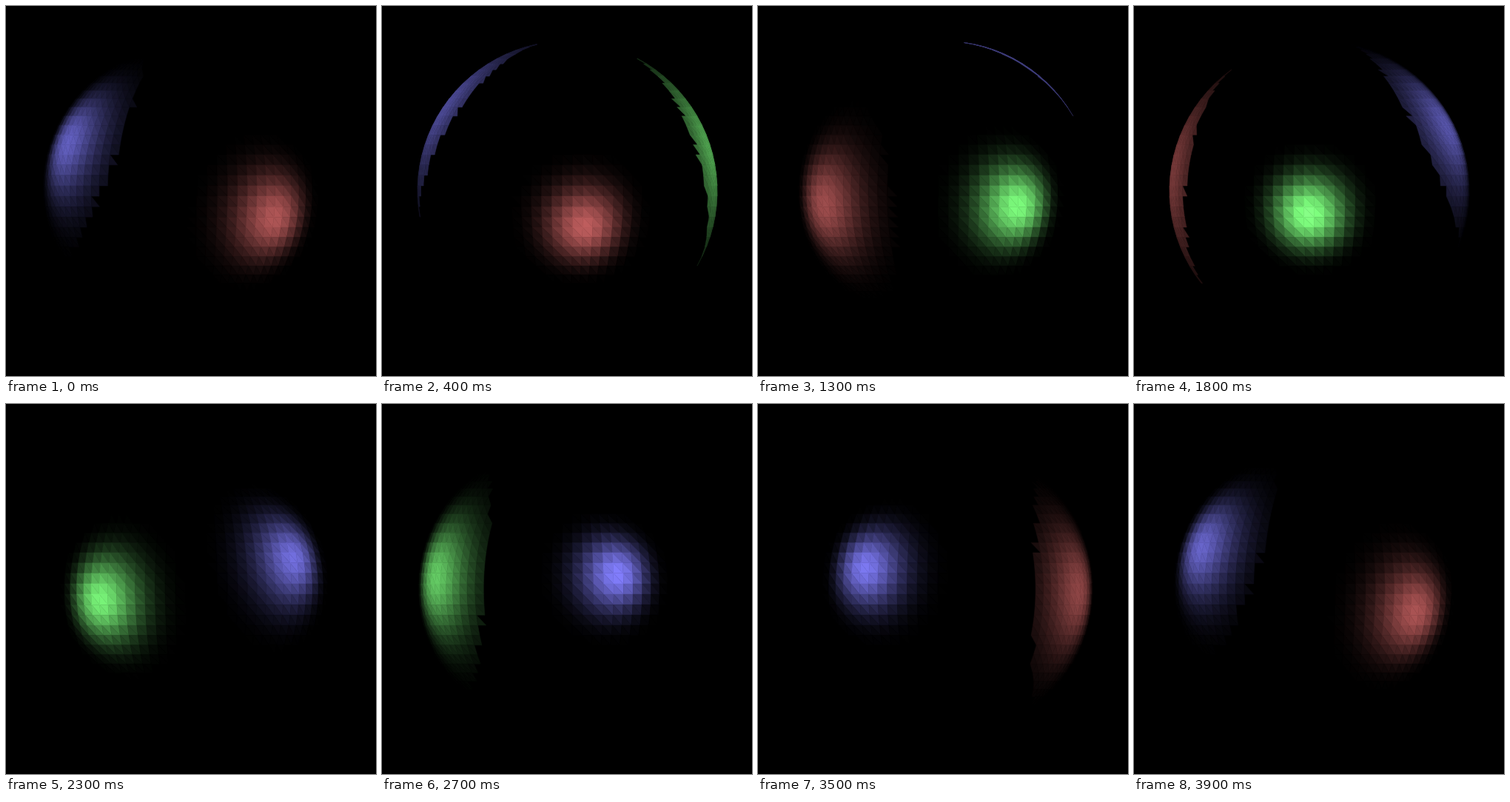
An HTML page with a canvas for the animation above (4 s loop, 500x500 px).

```html
<!DOCTYPE html>
<html lang="en">
<head>
<meta charset="utf-8">
<title>Three lights around a sphere</title>
<style>
html, body { margin: 0; width: 100%; height: 100%; overflow: hidden; background: #000; }
canvas { display: block; }
</style>
</head>
<body>
<canvas id="stage" width="500" height="500"></canvas>
<script>
const ctx = document.getElementById('stage').getContext('2d');
const LOOP = 4000, STEP = 100;
const CX = 250.5, CY = 250, R = 202.5;
const SEG = 45, RAD = Math.PI / 180;
const SHINE = 2.4, POWER = 0.65;

// Orbits in sphere radii: front is the time in ms the light passes the viewer.
const lights = [
  { color: [194, 95, 95], front: 500, radius: 1.65, height: 0.03, swing: 0.49 },
  { color: [126, 255, 126], front: 1740, radius: 1.6, height: -0.17, swing: 0.5 },
  { color: [112, 109, 218], front: 3002, radius: 1.43, height: -0.56, swing: 0.41 }
];

function vertex(col, row) {
  const lon = (col / SEG - 0.5) * Math.PI;
  const lat = (row / SEG - 0.5) * Math.PI;
  return [Math.cos(lat) * Math.sin(lon), Math.sin(lat), Math.cos(lat) * Math.cos(lon)];
}

function facet(a, b, c) {
  const sum = a.map((v, i) => v + b[i] + c[i]);
  const len = Math.hypot(...sum);
  const path = new Path2D();
  [a, b, c].forEach(p => path.lineTo(CX + p[0] * R, CY + p[1] * R));
  path.closePath();
  return { normal: sum.map(v => v / len), path };
}

const mesh = [];
for (let row = 0; row < SEG; row++) {
  for (let col = 0; col < SEG; col++) {
    const a = vertex(col, row), b = vertex(col + 1, row);
    const c = vertex(col, row + 1), d = vertex(col + 1, row + 1);
    if (row > 0) mesh.push(facet(a, b, d));
    if (row < SEG - 1) mesh.push(facet(a, d, c));
  }
}

function place(light, ms) {
  const turn = (light.front - ms) / LOOP * 360 * RAD;
  const depth = Math.sqrt(light.radius ** 2 - light.swing ** 2);
  const tilt = light.swing / light.radius;
  return [
    light.radius * Math.sin(turn),
    light.height + light.swing * Math.cos(turn),
    depth * Math.cos(turn) - light.height * tilt
  ];
}

// Mirror reflection toward the viewer, fading with distance to the light.
function shine(n, p) {
  const x = p[0] - n[0], y = p[1] - n[1], z = p[2] - n[2];
  const dist = Math.hypot(x, y, z);
  const facing = (n[0] * x + n[1] * y + n[2] * z) / dist;
  if (facing <= 0) return 0;
  const mirror = 2 * facing * n[2] - z / dist;
  return mirror > 0 ? mirror ** SHINE * POWER / dist : 0;
}

function draw(ms) {
  const spots = lights.map(l => place(l, ms));
  ctx.fillStyle = '#000';
  ctx.fillRect(0, 0, 500, 500);
  ctx.lineWidth = 0.5;
  ctx.lineJoin = 'round';
  for (const { normal, path } of mesh) {
    const rgb = [0, 0, 0];
    lights.forEach((light, i) => {
      const k = Math.min(1.15, shine(normal, spots[i]));
      if (k) light.color.forEach((v, j) => { rgb[j] += v * k; });
    });
    if (Math.max(...rgb) < 1) continue;
    const fill = `rgb(${rgb.map(v => Math.min(255, Math.round(v))).join(',')})`;
    ctx.fillStyle = ctx.strokeStyle = fill;
    ctx.fill(path);
    ctx.stroke(path);
  }
}

const start = performance.now();
let shown = -1;
function tick() {
  const ms = Math.floor((performance.now() - start) % LOOP / STEP) * STEP;
  if (ms !== shown) draw(shown = ms);
  requestAnimationFrame(tick);
}
tick();
</script>
</body>
</html>
```
